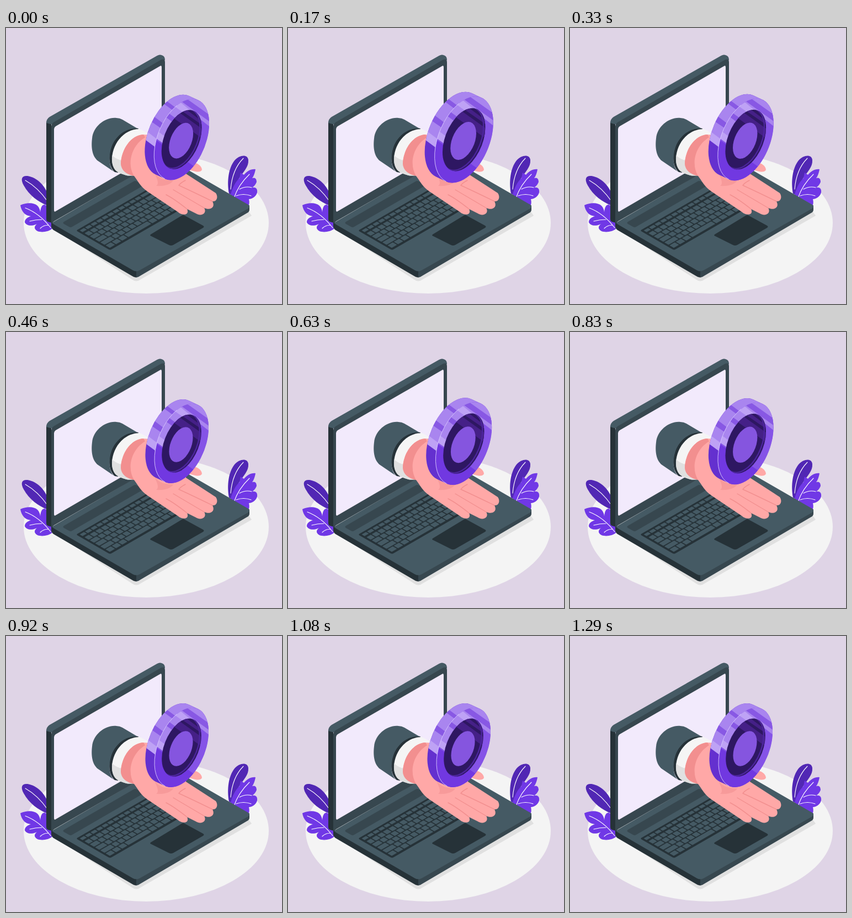
Recreate the animation shown at these times as an HTML page. Size 500 px wide and 500 px high, loop 1.54 s.

```html
<!DOCTYPE html>
<html lang="en">
<head>
<meta charset="utf-8">
<title>Coin in hand</title>
<style>
html, body { margin: 0; width: 100%; height: 100%; overflow: hidden; background: #dfd4e6; }
svg { display: block; width: 100%; height: 100%; }
.thin { fill: none; stroke-linecap: round; stroke-linejoin: round; }
</style>
</head>
<body>
<svg viewBox="0 0 500 500">
  <defs>
    <path id="body" transform="matrix(49 -28.3 0 66.3 318 202)"
      d="M.613-.79A1 1 0 0 1-.613 .79L-.96 .521A1 1 0 0 1 .266-1.059Z"/>
    <circle id="face" r="1" transform="matrix(49 -28.3 0 66.3 318 202)"/>
    <circle id="well" r=".73" transform="matrix(49 -28.3 0 66.3 318 202)"/>
    <clipPath id="inBody"><use href="#body"/></clipPath>
    <clipPath id="inFace"><use href="#face"/></clipPath>
    <clipPath id="inWell"><use href="#well"/></clipPath>
  </defs>

  <rect width="500" height="500" fill="#dfd4e6"/>
  <ellipse cx="254" cy="353" rx="222" ry="128" fill="#f4f4f4"/>

  <!-- plants -->
  <path fill="#5127b4" d="M76 322C58 315 42 303 32 285C26 274 28 267 39 268C57 271 70 286 76 301Z"/>
  <path fill="#7038e6" d="M83 364C77 369 65 371 57 368C50 364 51 359 56 355C46 360 37 358 34 352C34 346 39 343 45 341C35 340 28 333 26 321C38 316 50 316 57 322C60 325 62 330 62 334C63 325 65 320 70 320C78 323 83 336 84 350Z"/>
  <path class="thin" stroke="#fff" stroke-width="1.1" d="M35 276Q58 289 76 315M35 326Q61 336 81 362M43 350Q54 347 65 347M62 363Q68 357 77 357"/>
  <path fill="#5127b4" d="M404 300C400 278 403 254 414 240C424 229 438 229 439 239C440 252 430 260 422 273C416 283 413 292 412 304Z"/>
  <path fill="#7038e6" d="M405 310C408 294 414 280 423 272L425 262L431 266C437 259 444 255 452 256C451 262 449 268 446 272C451 270 454 273 454 279C452 284 449 287 446 289C452 288 456 291 455 298C453 306 445 310 440 310C442 318 440 325 433 328L410 320Z"/>
  <path class="thin" stroke="#fff" stroke-width="1.1" d="M430 236Q410 256 407 292M441 265Q421 284 413 308M423 292Q434 286 445 289M417 304Q430 299 444 304"/>

  <!-- laptop -->
  <path fill="#e0e0e0" d="M80 360L229 456Q236 461 243 456L445 340L438 330L236 441Z"/>
  <path fill="#263238" d="M82 350L236 439V452Q232 452 228 449L86 366Q82 363 82 359Z"/>
  <path fill="#37474f" d="M236 439L441 321V329Q441 333 437 335L243 449Q239 452 236 452Z"/>
  <path fill="#455a64" d="M83 353L288 233L437 319Q445 323 437 328L242 439Q236 442 230 439L87 356Z"/>
  <path fill="#263238" d="M73 170L82 174L87 350L83 353L76 351Q73 350 73 346Z"/>
  <path fill="#455a64" d="M73 172Q73 165 79 161L274 50Q279 47 284 50Q288 52 288 58L90 176L84 175Z"/>
  <path fill="#37474f" d="M82 179Q82 174 86 171L280 58Q288 54 288 62V234L82 353Z"/>
  <path fill="#f2eafc" d="M87 183Q87 180 90 178L279 69Q282 67 282 71V217Q282 220 279 222L90 332Q87 334 87 330Z"/>
  <path fill="#37474f" d="M105 351L231 278Q234 276 237 278L246 283Q249 285 246 287L120 360Q117 362 114 360L105 355Q102 353 105 351Z"/>
  <g id="keys" transform="matrix(.866 -.5 .866 .5 127 367)">
    <rect width="151" height="71" rx="3" fill="#263238"/>
  </g>
  <path fill="#263238" d="M262 374L318 340Q321 338 324 340L357 358Q360 360 357 362L303 393Q299 395 295 393L263 377Q260 376 262 374Z"/>

  <!-- arm -->
  <path fill="#263238" d="M240 182C220 178 202 190 192 211C184 230 186 252 197 261L203 262L214 240Z"/>
  <path fill="#455a64" d="M156 200C158 178 180 161 200 163Q206 163 211 166L238 182C218 181 202 193 193 211C185 230 186 251 195 260L167 241C156 233 154 216 156 200Z"/>
  <path fill="#f5f5f5" d="M242 183C212 183 191 212 192 241C193 253 199 259 206 263L218 267Q224 268 231 267L249 194L258 191Z"/>
  <path fill="#e0e0e0" d="M192 236C192 252 197 259 206 263L218 267Q224 268 231 267L210 240Q202 239 192 231Z"/>
  <path fill="#ffa8a7" d="M320 236L347 246Q355 251 355 257Q352 262 343 260L316 253Z"/>
  <path fill="#ffa8a7" d="M249 193C226 194 209 220 208 246C209 258 218 265 232 268C239 277 244 288 256 296L311 333C320 341 333 339 328 328L344 336C353 342 365 336 359 326C370 331 380 325 374 314C382 315 385 306 380 299L326 264L330 200Z"/>
  <path fill="#f28f8f" d="M249 193C226 194 209 220 208 246C209 258 218 265 232 268C219 247 226 214 252 198Z"/>
  <path fill="#f79a9a" d="M262 249C270 269 280 276 303 276C299 283 288 287 272 286C279 282 273 270 262 249Z"/>
  <path class="thin" stroke="#f28f8f" stroke-width="1.4" d="M290 302Q304 309 328 328M303 293L359 326M313 285Q337 296 374 314M313 285Q317 280 325 276"/>

  <!-- coin -->
  <g id="coin">
    <use href="#body" fill="#6430cf"/>
    <g clip-path="url(#inBody)" fill="#a985ef">
      <path d="M240 188L278 212L302 164L352 145L335 105H270Z"/>
      <path fill="#bea2f5" d="M246 180L282 207L276 219L246 197Z"/>
      <path fill="#8858e4" d="M255 164L290 188L294 180L261 155ZM279 133L302 150L307 145L284 128Z"/>
    </g>
    <use href="#face" fill="#7138e1"/>
    <g clip-path="url(#inFace)" fill="#a985ef">
      <path d="M260 194L378 276L365 112H260Z" opacity=".35"/>
      <path d="M260 191L300 219L332 151L378 187V110H260Z"/>
      <path fill="#bea2f5" d="M260 191L300 219V205L260 176ZM294 135L342 169L350 164L304 126Z"/>
      <path fill="#8858e4" d="M276 152L320 184L325 177L281 145ZM325 128L380 167V179L316 133Z"/>
    </g>
    <path class="thin" stroke="#dccbff" stroke-width=".9" vector-effect="non-scaling-stroke"
      transform="matrix(49 -28.3 0 66.3 318 202)" d="M-.613 .79A1 1 0 0 1-.174-.985"/>
    <use href="#well" fill="#2e1762"/>
    <g clip-path="url(#inWell)">
      <path fill="#452087" d="M300 144L360 187V204L290 154ZM324 147L360 174V180L318 151Z"/>
      <circle r=".73" transform="matrix(49 -28.3 0 66.3 315 200.5)" fill="none" stroke="#4c259d"
        stroke-width="2.4" vector-effect="non-scaling-stroke"/>
    </g>
    <circle r=".44" transform="matrix(49 -28.3 0 66.3 317 204)" fill="#8555df"/>
  </g>
</svg>
<script>
const NS = 'http://www.w3.org/2000/svg';
const keys = document.getElementById('keys');
const coin = document.getElementById('coin');

function key(x, y, w, h) {
  const r = document.createElementNS(NS, 'rect');
  for (const [k, v] of Object.entries({ x, y, width: w, height: h, rx: 1, fill: '#455a64' })) {
    r.setAttribute(k, v);
  }
  keys.append(r);
}

// each row starts with a wider key, the rest share one pitch
function row(y, h, first, pitch) {
  key(4, y, first, h);
  let x = 4 + first + 2;
  while (x + pitch * 1.5 < 147) {
    key(x, y, pitch - 2, h);
    x += pitch;
  }
  key(x, y, 147 - x, h);
}

row(3.5, 6, 9, 11.5);
[9, 14, 17, 21].forEach((first, i) => row(13.5 + i * 11, 9, first, 11.5));
[[4, 11], [17, 11], [30, 11], [43, 48], [93, 11], [106, 11], [119, 13], [134, 13]]
  .forEach(([x, w]) => key(x, 57.5, w, 9));

const LOOP = 1540, LEAD = 27;
const beat = [[0, 1], [150, 1.1], [450, 1], [600, 1], [750, 1.1], [900, 1], [1600, 1]];

function scaleAt(t) {
  const i = beat.findIndex(([end]) => t < end);
  const [t0, a] = beat[i - 1], [t1, b] = beat[i];
  return a + (b - a) * (t - t0) / (t1 - t0);
}

function draw(now) {
  const s = scaleAt(now % LOOP + LEAD);
  coin.setAttribute('transform', `translate(309.6 198) scale(${s}) translate(-309.6 -198)`);
}

const start = performance.now();
function tick() {
  draw(performance.now() - start);
  requestAnimationFrame(tick);
}
tick();
</script>
</body>
</html>
```
